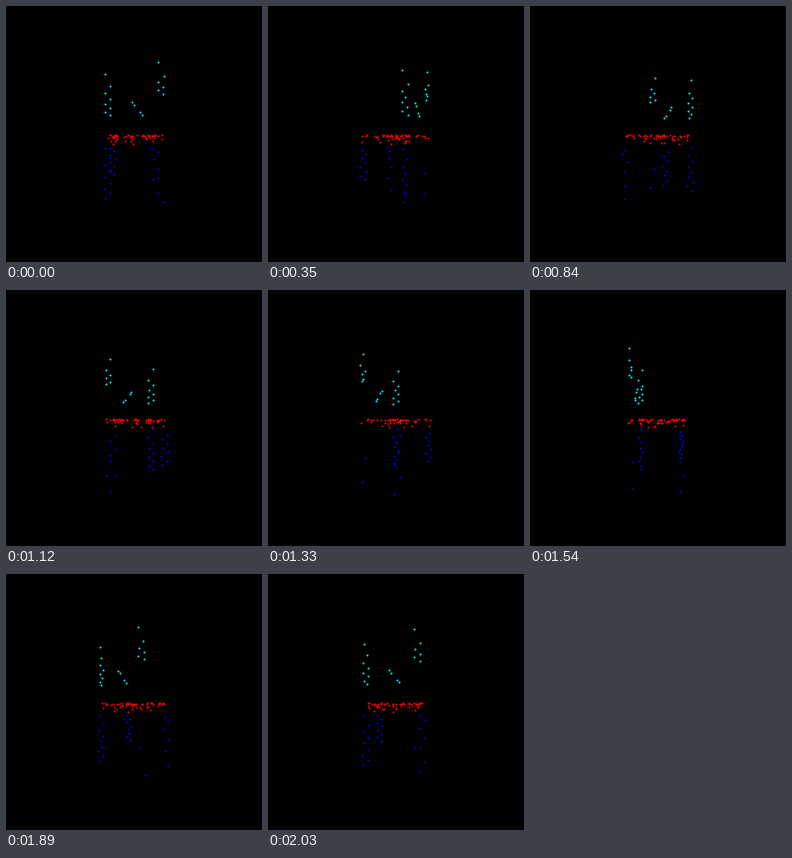
Recreate the animation shown at these times as an HTML page with a canvas. Size 256 px wide and 256 px high, loop 2100 ms.

```html
<!DOCTYPE html>
<html lang="en">
<head>
<meta charset="utf-8">
<title>Rotating chair of points</title>
<style>
  html, body { margin: 0; width: 100%; height: 100%; overflow: hidden; background: #000; }
  canvas { display: block; }
</style>
</head>
<body>
<canvas id="stage" width="256" height="256"></canvas>
<script>
const ctx = document.getElementById('stage').getContext('2d');
const STEP = 70, STEPS = 30;
const CENTER = 128, DISTANCE = 220, RADIUS = 1;
const SIDE = 24, FRONT = 22.5, SEAT = 27;

function seededRandom(seed) {
  return () => (seed = (seed * 16807) % 2147483647) / 2147483647;
}
const random = seededRandom(4721);
const between = (a, b) => a + (b - a) * random();
const list = (count, make) => Array.from({ length: count }, (_, i) => make(i));

// Points are [x, y down, z toward the viewer], measured from the centre.
// A post alternates between its two sides; ease bends the vertical spacing.
function post(x, z, top, bottom, count, ease = 1) {
  return list(count, i => [
    x + (i % 2 ? 2.4 : -2.4),
    top + (bottom - top) * (i / (count - 1)) ** ease,
    z + between(-2, 2)
  ]);
}

// Pairs of points at both ends of a slanted rail.
function rail(x1, y1, x2, y2, z) {
  return [0, 0.23, 0.78, 1].map(t => [x1 + (x2 - x1) * t, y1 + (y2 - y1) * t, z]);
}

function slab(count, top, bottom) {
  return list(count, () => [between(-SEAT, SEAT), between(top, bottom), between(-SEAT, SEAT)]);
}

const back = [
  ...post(-SIDE, FRONT, -54.5, -16.5, 8, 0.6),
  ...post(SIDE, FRONT, -64, -36.3, 6, 0.5),
  ...rail(-1.8, -29.1, 7.2, -17.5, FRONT - 0.5)
];

const legs = [
  ...post(-SIDE, FRONT, 12.8, 57.8, 9, 0.8),
  ...post(-SIDE, -FRONT, 15, 43.5, 8),
  ...post(SIDE, FRONT, 40, 62, 2),
  ...post(SIDE, -FRONT, 15.3, 64.3, 6, 1.5)
];

const seat = [...slab(30, 1.2, 2.2), ...slab(15, 2.8, 6), ...slab(6, 6.5, 10)];

const parts = [
  { color: '#00f', points: legs },
  { color: '#f00', points: seat },
  { color: '#0ff', points: back }
];

// Dots sit on pixel centres, so only their rims are soft.
const snap = v => Math.round(CENTER + v) + 0.5;

function dot(x, y) {
  ctx.beginPath();
  ctx.arc(snap(x), snap(y), RADIUS, 0, 2 * Math.PI);
  ctx.fill();
}

function draw(angle) {
  const c = Math.cos(angle), s = Math.sin(angle);
  ctx.fillStyle = '#000';
  ctx.fillRect(0, 0, 256, 256);
  for (const { color, points } of parts) {
    ctx.fillStyle = color;
    for (const [x, y, z] of points) {
      const scale = DISTANCE / (DISTANCE - (z * c - x * s));
      dot((x * c + z * s) * scale, y * scale);
    }
  }
}

const start = performance.now();

function tick() {
  const step = Math.floor((performance.now() - start) / STEP) % STEPS;
  draw(step * 2 * Math.PI / STEPS);
  requestAnimationFrame(tick);
}
tick();
</script>
</body>
</html>
```
